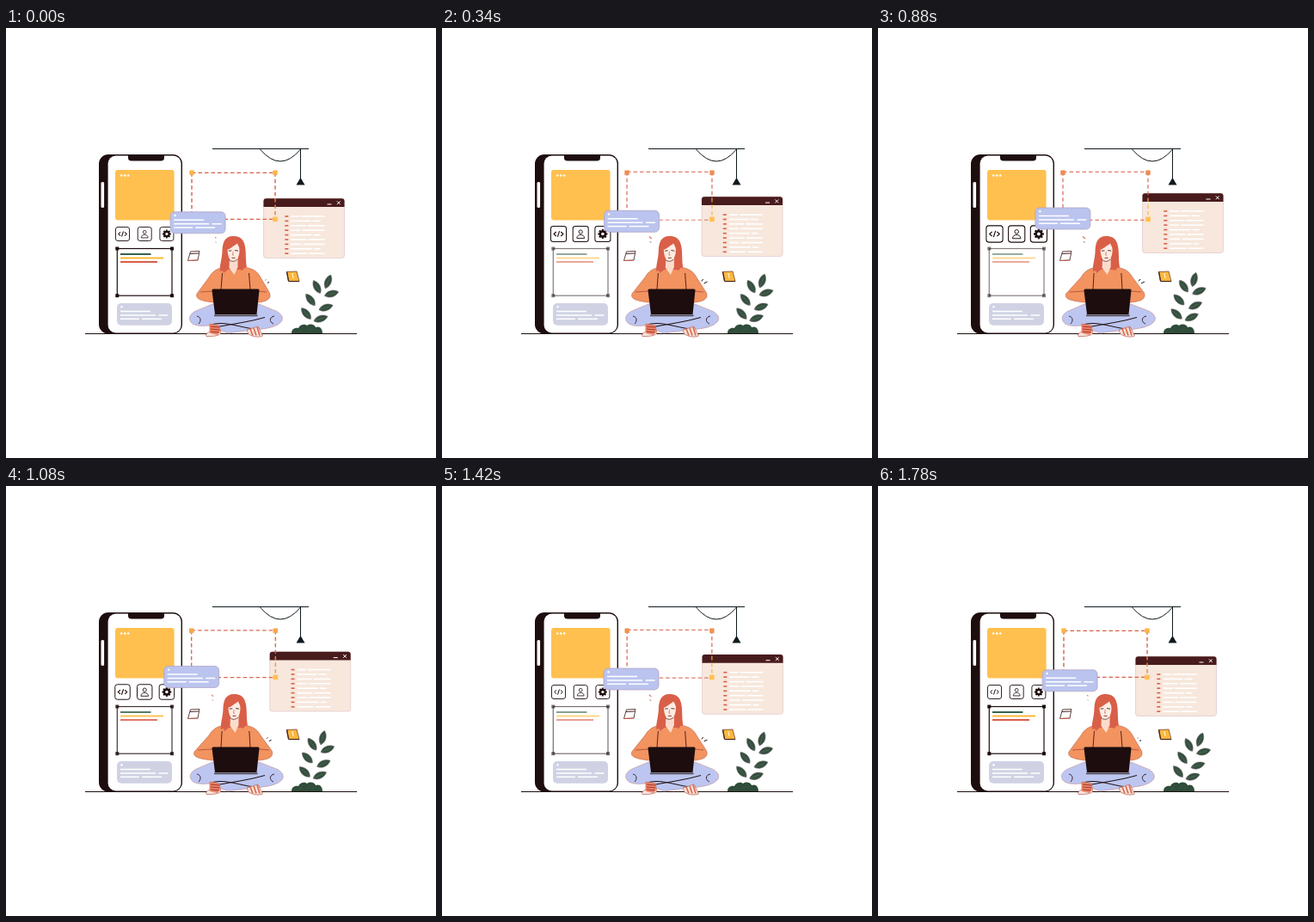
An HTML page with a canvas for the animation above (1.8 s loop, 500 px wide and 500 px high).

```html
<!DOCTYPE html>
<html lang="en">
<head>
<meta charset="utf-8">
<title>App designer at work</title>
<style>
html, body { margin: 0; width: 100%; height: 100%; overflow: hidden; background: #fff; }
canvas { display: block; width: 100vw; height: 100vh; }
</style>
</head>
<body>
<canvas id="stage" width="500" height="500"></canvas>
<script>
const c = document.getElementById('stage').getContext('2d');
const LOOP = 1800;
const INK = '#1d0d0e', RED = '#d95f48', YELLOW = '#ffc04f', GREEN = '#33503f';
const wave = (t, period) => (1 - Math.cos(2 * Math.PI * t / period)) / 2;

function mix(a, b, k) {
  return 'rgb(' + a.map((v, i) => Math.round(v + (b[i] - v) * k)).join(',') + ')';
}

function box(x, y, w, h, r, fill, stroke, width = 1) {
  c.beginPath();
  c.roundRect(x, y, w, h, r);
  if (fill) { c.fillStyle = fill; c.fill(); }
  if (stroke) { c.strokeStyle = stroke; c.lineWidth = width; c.stroke(); }
}

function line(x1, y1, x2, y2, color = INK, width = 1) {
  c.strokeStyle = color;
  c.lineWidth = width;
  c.beginPath();
  c.moveTo(x1, y1);
  c.lineTo(x2, y2);
  c.stroke();
}

function shape(d, fill, stroke, width = 1) {
  const p = new Path2D(d);
  if (fill) { c.fillStyle = fill; c.fill(p); }
  if (stroke) { c.strokeStyle = stroke; c.lineWidth = width; c.stroke(p); }
}

function dot(x, y, r, fill) {
  c.fillStyle = fill;
  c.beginPath();
  c.arc(x, y, r, 0, 7);
  c.fill();
}

function square(x, y, s, fill) {
  c.fillStyle = fill;
  c.fillRect(x - s / 2, y - s / 2, s, s);
}

function at(x, y, draw, scale = 1, angle = 0) {
  c.save();
  c.translate(x, y);
  c.rotate(angle);
  c.scale(scale, scale);
  draw();
  c.restore();
}

function message(x, y, w, h, color, edge) {
  at(x, y, () => {
    box(0, 0, w, h, 5, color, edge, 0.7);
    dot(5.5, 4.2, 1.2, '#fff');
    line(4, 9.5, 39, 9.5, '#fff', 1.5);
    line(4, 14, 45, 14, '#fff', 1.5);
    line(48.5, 14, 59.5, 14, '#fff', 1.5);
    line(4, 18.3, 26, 18.3, '#fff', 1.5);
    line(29, 18.3, 52, 18.3, '#fff', 1.5);
  });
}

function room() {
  line(92, 355.5, 408, 355.5, INK, 1);
  line(240, 140.5, 352, 140.5, '#101a1e', 1);
  shape('M295.5 141 Q319 169 342.5 141', null, '#101a1e');
  line(342.5, 141, 342.5, 176, '#101a1e', 1);
  shape('M342.5 174 L347.5 182.5 H337.5 Z', '#101a1e');
}

function phone() {
  box(108, 147, 97, 208.5, 11, INK);
  box(118.6, 148.6, 85, 205.9, 9, '#fff');
  shape('M142 148 H184 V151 Q184 154.5 180 154.5 H146 Q142 154.5 142 151 Z', INK);
  box(110.5, 179, 3.6, 30, 1.5, '#fff');
  box(127, 165, 68.6, 58.6, 3, YELLOW);
  for (let i = 0; i < 3; i++) dot(134.2 + i * 4, 171.5, 1.3, '#fff');
  message(129, 320, 64, 25.7, '#d0d2e4');
}

function panel(dim) {
  c.globalAlpha = 1 - dim * 0.48;
  c.strokeStyle = INK;
  c.lineWidth = 1.2;
  c.strokeRect(129.3, 256.5, 63.7, 54.7);
  for (const x of [129.3, 193]) for (const y of [256.5, 311.2]) square(x, y, 4, INK);
  line(133, 263, 168.5, 263, '#356349', 2);
  line(133, 267.6, 183, 267.6, '#fdb935', 2);
  line(133, 272.1, 176, 272.1, RED, 2);
  c.globalAlpha = 1;
}

const glyphs = [
  () => {
    shape('M-2.4 -2.2 L-4.8 0 L-2.4 2.2 M2.4 -2.2 L4.8 0 L2.4 2.2 M1 -3 L-1 3', null, INK, 1);
  },
  () => {
    c.beginPath();
    c.arc(0, -2.2, 1.9, 0, 7);
    c.strokeStyle = INK;
    c.lineWidth = 0.8;
    c.stroke();
    shape('M-3.9 4.4 C-3.9 -0.4 3.9 -0.4 3.9 4.4 Z', null, INK, 0.8);
  },
  () => {
    for (let i = 0; i < 4; i++) at(0, 0, () => line(0, -4.9, 0, 4.9, INK, 2), 1, i * Math.PI / 4);
    dot(0, 0, 3.8, INK);
    dot(0, 0, 1.6, '#fff');
  }
];

function icons(grow) {
  glyphs.forEach((glyph, i) => at(135.5 + i * 25.7, 239.5, () => {
    box(-8, -8, 16, 16, 2.5, '#fff', INK, 0.9);
    glyph();
  }, 1 + grow * 0.25));
}

function selection(dim) {
  const l = 216 - dim, r = 313 + dim, top = 168.3 - dim, bottom = 222.3 + dim;
  c.globalAlpha = 1 - 0.2 * dim;
  c.setLineDash([4.5, 3]);
  line(l, top, r, top, RED, 1.3);
  line(l, bottom, r, bottom, RED, 1.2);
  line(l, top, l, bottom, RED, 1.4);
  line(r, top, r, 198, RED, 1.4);
  line(r, 198, r, bottom, mix([230, 130, 75], [253, 181, 67], dim), 1.4);
  c.setLineDash([]);
  c.globalAlpha = 1;
  const corner = mix([253, 181, 67], [238, 139, 82], dim);
  square(l, 168.2, 5.4, corner);
  square(r, 168.2, 5.4, corner);
  square(r, 222.4, 5.6, YELLOW);
}

function codeWindow(k) {
  at(299.5 + 8 * k, 198.2 - 6 * k, () => {
    box(0, 0, 94, 69.3, 3, '#f7e7dc', '#dcc0c4', 0.6);
    box(0, 0, 94, 9.7, [3, 3, 0, 0], '#481b1d');
    line(74, 6.8, 79, 6.8, '#fff', 1);
    line(85.4, 3.2, 89.2, 7, '#fff', 1);
    line(89.2, 3.2, 85.4, 7, '#fff', 1);
    for (let i = 0; i < 9; i++) {
      const y = 20.8 + i * 5.4;
      line(24.8, y, 28.8, y, RED, 1.6);
      const gap = 42 + (i * 13) % 19;
      line(31.5, y, gap, y, '#fff', 1.6);
      line(gap + 2, y, i % 3 === 1 ? 66 : 71, y, '#fff', 1.6);
    }
  });
}

// Each leaf: x, y from the root, and its angle in degrees.
const leaves = [
  [22.5, -52, -68], [9.5, -46, -118], [26.5, -38, -16], [2, -31, -128],
  [20, -22, -18], [-3, -15, -130], [14, -9, -18]
];

function plant(k) {
  at(352, 347, () => {
    for (const [x, y, deg] of leaves) at(x, y, () => {
      shape('M-8.5 0 C-4 -5.2 4 -4.8 8.5 0 C4 4.8 -4 5.2 -8.5 0 Z', GREEN, '#7d6b70', 0.5);
      line(-8, 0, 4, 0, '#6c7167', 0.5);
    }, 1, deg * Math.PI / 180);
  }, 1, -0.13 * k);
  shape('M332 355 C332 350 336 348 340 349 C342 344 348 344 350 346 C354 343 359 345 360 348 C365 346 368 350 368 355 Z', '#2f4d3a');
  shape('M339 354 Q341 350 345 352 M350 352 Q354 348 358 352', null, '#4c5646', 0.7);
}

function papers() {
  shape('M214.5 260 L225 259.5 L223 270 L211.5 270.5 Z', '#fff', '#4d2a2a', 0.9);
  line(214, 262.5, 224, 262, '#4d2a2a', 1.2);
  line(212, 270.4, 222, 270.2, RED, 0.9);
  shape('M326.5 283.5 L338 283 L341 294.5 L328.5 294.5 Z', '#fbb73d', '#6a3026', 0.7);
  line(326.5, 283.5, 328.5, 294, '#3b201b', 1.3);
  line(328.5, 294.6, 341, 294.6, '#3b201b', 1.1);
  line(333, 285, 334, 291, '#fff3d6', 1.2);
}

function sparks(k, dim) {
  const s = 0.35 + 0.65 * dim, x = 244 - 4 * k;
  line(x - 2 * s, 243.5 - s, x + s, 244 + s, '#d86f50', 1.1);
  line(x - s, 249 - s, x + 0.5, 249 + s, k < 0.1 ? '#5f9367' : '#a57866', 1);
  const r = 302 + 2 * k;
  line(r - s, 292.5 + 2 * s, r + s, 293 - s, INK, 1);
  line(r + 2, 296 + s, r + 3 + 3 * s, 296 - s, INK, 1);
}

function legs(k) {
  const l = 212.5 + 0.8 * k, r = 322 + k;
  shape(`M240 321 L${l + 7} 329.5 Q${l - 2} 335 ${l + 2} 341.5 Q${l + 6} 348 237 346 L258 355 L286 351
    Q${r - 8} 350 ${r - 1.5} 341 Q${r + 2} 335 ${r - 7} 329.5 L294 321 Z`, '#bcc6f1', '#c98d91', 0.6);
  shape('M246 347.5 C264 344 282 342 301 336.5 M238 345 C250 342 258 344 268 346 C277 348 282 349 288 350', null, INK, 1);
  shape('M222 335 C227 336 227 341 224 344 M312 335 C306 336 306 342 311 344', null, '#38242f', 1);
  shape('M237 344 L248 346 L250 355 Q247 359 233 358.5 Q231 356 237 353 Z', '#f6e5df', '#b85a4b', 0.7);
  shape('M237 344 L248 346 L249 352 L246 357 L237 355 Z', '#e98568');
  for (let i = 0; i < 3; i++) line(238, 347 + i * 3, 248.5, 348 + i * 3, '#a9372f', 1.1);
  shape('M280 351 L293 347 L298.5 358 Q291 361 282 356 Z', '#f6e3da', '#b85a4b', 0.7);
  for (let i = 0; i < 3; i++) line(284 + i * 4, 350 - i, 287 + i * 4, 357.5, '#dc674c', 1.6);
}

function woman(k) {
  legs(k);
  const l = 221 - 3.3 * k, r = 307 + 3 * k;
  shape(`M256 278 C245 279 240 283 236 290 L${l + 1} 309 C${l - 1} 315 ${l + 5} 317 240 319 H294
    C${r - 4} 318 ${r + 2} 315 ${r - 0.5} 308 L296 290 C292 282 285 278 272 278 Z`, '#f29360', '#bb6046', 0.6);
  line(251.5 - k * 0.4, 285, 250, 304, '#5b211c', 1);
  line(282.5 + k * 0.4, 285, 284, 304, '#5b211c', 1);
  line(l + 5, 307, 240, 306, '#a94b38', 0.8);
  line(r - 4, 307, 294, 306, '#a94b38', 0.8);

  at(k * 1.1, 0, () => {
    shape('M264 242 C254 242 252 250 251.5 258 C251.5 268 248 276 249 283 L252 282 L253 285 L258 281 L272 281 L275 282 L277 279 L280 278.5 C278 268 280 257 276.5 249 C274 243 269 242 264 242 Z', RED);
    shape('M260 267 H269.5 V278 L265.5 287 L259.5 279 Z', '#fbdccc');
    shape('M257.5 254 C262 255 267 253 269 250 L271.5 256 C272 266 268 271.5 264.5 271.5 C260 271.5 257 264 257.5 254 Z', '#ffece3');
    shape('M257.5 258 C262 256 266 253 267.5 249.5 C271 252 272 256 272 261 C276 254 273 246 264 246 C257 247 255 252 257.5 258 Z', RED);
    line(258.8, 259.2, 262.3, 258.8, '#4a201c', 0.9);
    line(266, 258.5, 270, 259.2, '#4a201c', 0.9);
    shape('M264.2 260 L263.5 264 L265 264.2', null, '#b9634f', 0.7);
    line(262.5, 267.4, 266.5, 267.3, '#9e2f2b', 1);
    shape('M259.5 269.5 Q264 273.5 269 269', null, '#4a201c', 0.7);
  });

  shape('M241 303.5 H293 Q294.7 303.5 294.5 305 L291.5 333 H243 L239.5 305 Q239.4 303.5 241 303.5 Z', INK);
  line(242, 334.4, 292.5, 334.4, '#50474b', 1.8);
}

function draw(t) {
  const sway = wave(t, LOOP);
  const dim = wave(t, LOOP / 3);
  const grow = t < 1360 ? wave(t, 1360) : 0;
  c.fillStyle = '#fff';
  c.fillRect(0, 0, 500, 500);
  room();
  phone();
  panel(dim);
  icons(grow);
  codeWindow(sway);
  selection(dim);
  message(191.1 - 8.2 * sway, 213.8 - 4.8 * sway, 64, 25, '#bac4ee', '#b09cbd');
  plant(sway);
  papers();
  sparks(sway, dim);
  woman(sway);
}

function tick() {
  draw(performance.now() % LOOP);
  requestAnimationFrame(tick);
}
tick();
</script>
</body>
</html>
```
